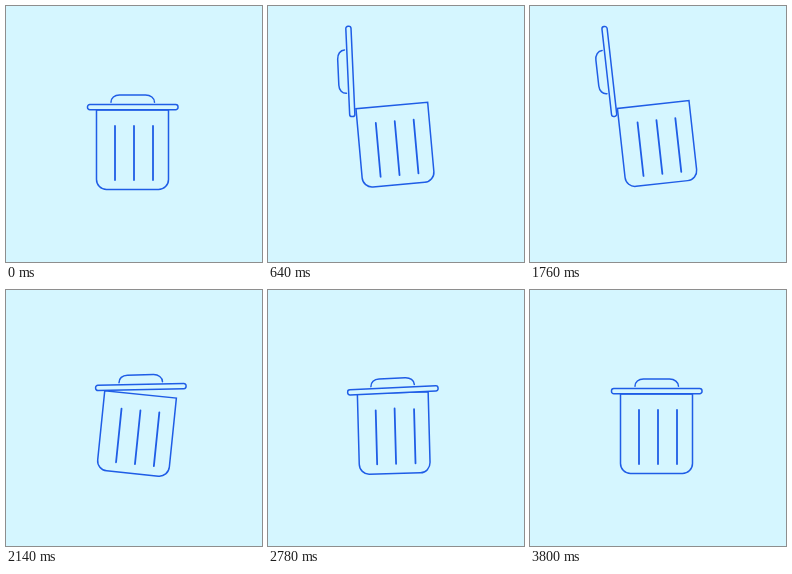
These frames come from a looping animation (256 by 256 pixels, 3.82 s). An HTML page:

```html
<!DOCTYPE html>
<html lang="en">
<head>
<meta charset="utf-8">
<title>Bin</title>
<style>
  html, body { margin: 0; width: 100%; height: 100%; overflow: hidden; background: #d5f6ff; }
  svg { display: block; width: 100%; height: 100%; }
  path, rect { fill: none; stroke: #1f5de6; stroke-width: 1.5; stroke-linecap: round; vector-effect: non-scaling-stroke; }
  #lid rect { fill: #d5f6ff; }
  .rib { stroke-width: 1.8; }
</style>
</head>
<body>
<svg viewBox="0 0 256 256">
  <g id="body">
    <path d="M-36 -79.5V-10A10 10 0 0 0 -26 0H26A10 10 0 0 0 36 -10V-79.5Z"/>
    <path class="rib"/>
    <path class="rib"/>
    <path class="rib"/>
  </g>
  <g id="lid">
    <path d="M14.5 -7.7C14.5 -12 18 -15 23 -15H49C54 -15 58 -12 58 -7.7"/>
    <rect x="-9" y="-5.5" width="90.5" height="5.2" rx="2.3"/>
  </g>
</svg>
<script>
const LOOP = 3820;
const OPEN_ANGLE = -108.2;
const BASE = { x: 126.5, y: 183.5 };
const CORNER = { x: -36, y: -79.5 };

const progress = (t, from, to) => Math.min(1, Math.max(0, (t - from) / (to - from)));
const smooth = (t, from, to) => {
  const u = progress(t, from, to);
  return u * u * (3 - 2 * u);
};
const bell = (t, from, to) => Math.sin(Math.PI * progress(t, from, to)) ** 2;

// Time and angle at each turning point of the bin: lean back, slam, rock to rest
const turns = [[0, 0], [1080, -8], [1640, -8], [2210, 6.4], [2660, -6.2], [2900, 3], [3200, 0]];

const tiltAt = t => turns.slice(1).reduce((sum, [time, angle], i) => {
  const [before, from] = turns[i];
  return sum + (angle - from) * smooth(t, before, time);
}, 0);

// The lid eases open, then falls shut under gravity
const opennessAt = t => smooth(t, 0, 850) - progress(t, 1555, 2160) ** 2;

const body = document.getElementById('body');
const lid = document.getElementById('lid');
const ribs = document.querySelectorAll('.rib');

function draw(t) {
  const tilt = tiltAt(t);
  const open = opennessAt(t);
  const rebound = bell(t, 2230, 2900);
  const lift = t < 2100 ? Math.max(0, -tilt) : 0;
  const stretch = 1 + 0.06 * rebound;

  const x = BASE.x + 0.86 * lift + 1.5 * rebound;
  const y = BASE.y - 0.95 * lift;
  body.setAttribute('transform',
    `translate(${x} ${y}) rotate(${tilt}) scale(${1 / stretch} ${stretch})`);

  // The hinge rides on the top left corner of the body
  const a = tilt * Math.PI / 180;
  const hingeX = x + CORNER.x * Math.cos(a) - CORNER.y * Math.sin(a) - 1.3 * open;
  const hingeY = y + CORNER.x * Math.sin(a) + CORNER.y * Math.cos(a) - 1.4 * open;
  const lidAngle = OPEN_ANGLE * open + tilt * (1 - open) - 4 * rebound;
  lid.setAttribute('transform', `translate(${hingeX} ${hingeY}) rotate(${lidAngle})`);

  // The ribs trail behind the body and settle last
  const trail = -2.9 * bell(t, 2760, 3500);
  ribs.forEach((rib, i) => {
    const shift = trail + (0.9 * i * i - 1) * rebound;
    const shorten = (i === 1 ? -1.5 : 3) * rebound;
    rib.setAttribute('d', `M${19 * i - 17.5 + shift} ${-63.5 + shorten}V-9.5`);
  });
}

const start = performance.now();
function tick() {
  draw((performance.now() - start) % LOOP);
  requestAnimationFrame(tick);
}
tick();
</script>
</body>
</html>
```
